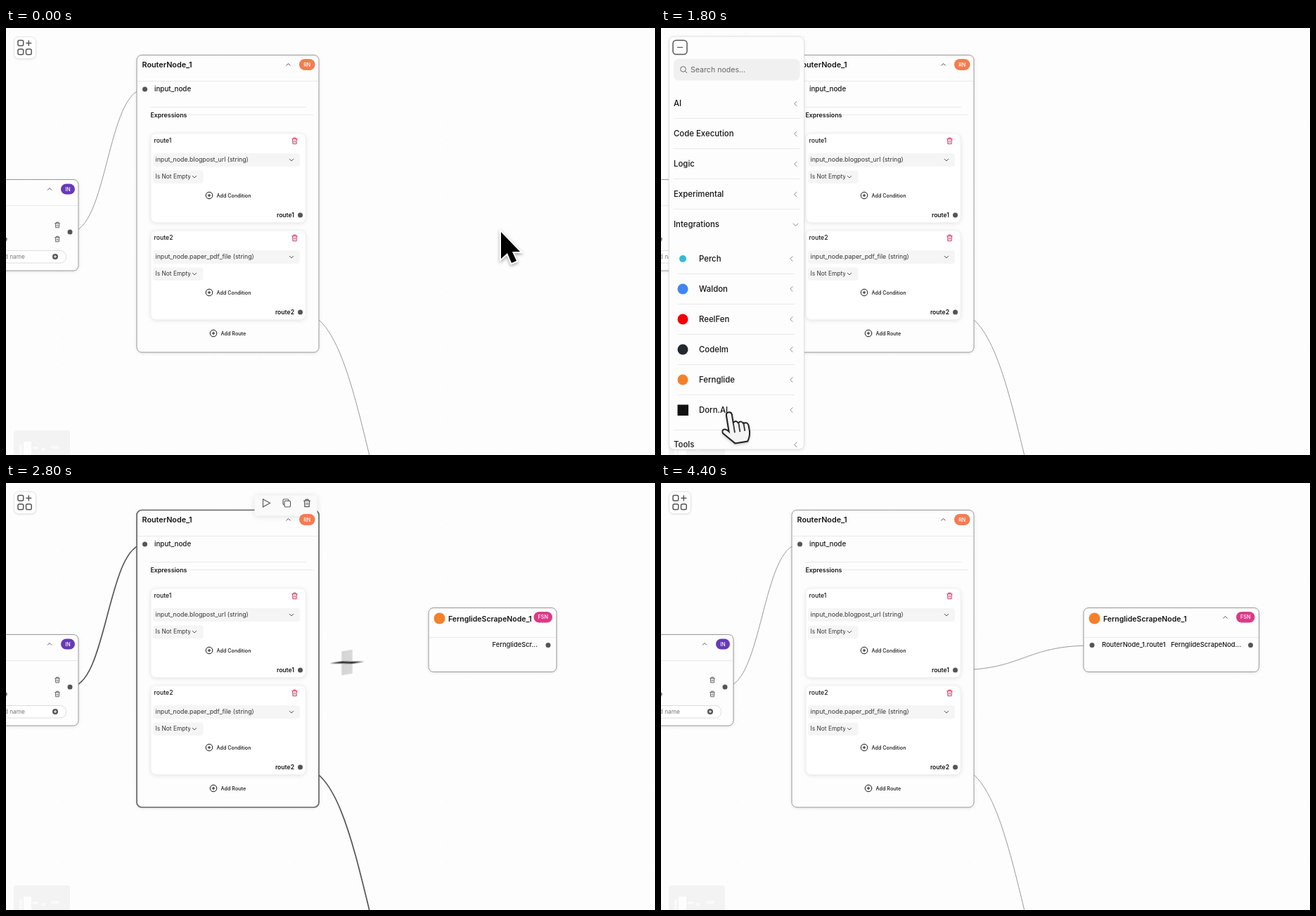
Write an HTML page with a canvas that moves like this. It is 923 px wide and 607 px high and loops after 4540 ms.

```html
<!DOCTYPE html>
<html lang="en">
<head>
<meta charset="utf-8">
<title>Node editor</title>
<style>
html, body { margin: 0; width: 100%; height: 100%; overflow: hidden; background: #fdfdfd; }
canvas { display: block; width: 923px; height: 607px; }
</style>
</head>
<body>
<canvas id="stage" width="923" height="607"></canvas>
<script>
const W = 923, H = 607, LOOP = 4540, STEP = 200 / 3, LAST = 66;
const stage = document.getElementById('stage').getContext('2d');
const newLayer = () => Object.assign(document.createElement('canvas'), { width: W, height: H }).getContext('2d');
const blur = newLayer(), sprite = newLayer();
let c = stage;

const BRAND = 'Fernglide';
const FLAME = '#f4812a', INK = '#151515', GRAY = '#555', RED = '#d0305f';
const T = { panelOpen: 960, nodeAdded: 1930, panelClose: 2130, routerPicked: 2690, connected: 2930, edgeLeft: 3400 };

// Pointer stops: time, x, y, shape used from the previous stop to this one
const STOPS = [
  [0, 704, 290, 'arrow'], [130, 704, 290, 'arrow'],
  [900, 34, 14, 'grab'], [1064, 34, 14, 'hand'],
  [1458, 100, 515, 'hand'], [1600, 100, 515, 'hand'],
  [1720, 100, 545, 'hand'], [2098, 100, 545, 'hand'],
  [2358, 770, 345, 'grab'], [2400, 770, 345, 'grab'],
  [2560, 644, 203, 'grab'], [2690, 419, 266, 'grab'],
  [2715, 419, 266, 'cross'], [2915, 601, 236, 'cross'],
  [3330, 601, 236, 'cross'], [3600, 700, 437, 'arrow'],
  [LOOP, 700, 437, 'arrow']
];

const ease = p => p < .5 ? 2 * p * p : 1 - 2 * (1 - p) * (1 - p);
const span = (t, a, b) => ease(Math.min(1, Math.max(0, (t - a) / (b - a))));
const between = (t, a, b) => t >= a && t < b;

function text(str, x, y, size, { weight = 500, color = INK, align = 'left' } = {}) {
  c.font = `${weight} ${size}px Inter, sans-serif`;
  c.fillStyle = color;
  c.textAlign = align;
  c.textBaseline = 'middle';
  c.fillText(str, x, y);
}

function box(x, y, w, h, r, fill, stroke, width = 1, shadow = 0) {
  c.save();
  c.beginPath();
  c.roundRect(x, y, w, h, r);
  if (shadow) {
    c.shadowColor = 'rgba(0,0,0,.12)';
    c.shadowBlur = shadow;
    c.shadowOffsetY = 1;
  }
  if (fill) { c.fillStyle = fill; c.fill(); }
  c.restore();
  if (stroke) { c.strokeStyle = stroke; c.lineWidth = width; c.stroke(); }
}

function disc(x, y, r, fill, stroke) {
  c.beginPath();
  c.arc(x, y, r, 0, 7);
  if (fill) { c.fillStyle = fill; c.fill(); }
  if (stroke) { c.strokeStyle = stroke; c.lineWidth = 1; c.stroke(); }
}

function line(points, color = '#e9e9e9', width = 1) {
  c.beginPath();
  points.forEach(([x, y]) => c.lineTo(x, y));
  c.strokeStyle = color;
  c.lineWidth = width;
  c.stroke();
}

const rule = (x1, x2, y, color) => line([[x1, y + .5], [x2, y + .5]], color);

function plus(x, y, r, color, width) {
  line([[x - r, y], [x + r, y]], color, width);
  line([[x, y - r], [x, y + r]], color, width);
}

const CHEVRON = { up: [0, -1], down: [0, 1], left: [-1, 0] };
function chevron(x, y, dir, s = 3, color = GRAY) {
  const [dx, dy] = CHEVRON[dir], h = s / 2;
  line([[x - dx * h - dy * s, y - dy * h - dx * s], [x + dx * h, y + dy * h],
        [x - dx * h + dy * s, y - dy * h + dx * s]], color);
}

function trash(x, y, color, s = 1) {
  c.save();
  c.translate(x, y);
  c.scale(s, s);
  line([[-4, -2.7], [4, -2.7]], color);
  line([[-1.6, -2.9], [-1.6, -4.3], [1.6, -4.3], [1.6, -2.9]], color);
  line([[-3, -2.5], [-2.6, 4.2], [2.6, 4.2], [3, -2.5]], color);
  line([[-.9, -.8], [-.9, 2.4]], color, .8);
  line([[.9, -.8], [.9, 2.4]], color, .8);
  c.restore();
}

function badge(label, x, y, w, h, color) {
  box(x, y, w, h, h / 2, color);
  text(label, x + w / 2, y + h / 2 + .5, 7.2, { color: '#fff', align: 'center' });
}

function edge(x1, y1, x2, y2, strong) {
  const mid = (x1 + x2) / 2;
  c.beginPath();
  c.moveTo(x1, y1);
  c.bezierCurveTo(mid, y1, mid, y2, x2, y2);
  c.strokeStyle = strong ? '#555' : '#999';
  c.lineWidth = strong ? 1.7 : 1;
  c.stroke();
}

function frame(x, y, w, h, strong) {
  box(x, y, w, h, 7, '#fdfdfd', strong ? '#666' : '#999', strong ? 1.7 : 1, 5);
}

function toolbar(right, top) {
  box(right - 92, top - 21, 89, 29, 4, '#fafafa', null, 0, 9);
  const x = right - 75.5, y = top - 10;
  line([[x - 4.5, y - 5.5], [x + 5.5, y], [x - 4.5, y + 5.5], [x - 4.5, y - 5.5], [x, y - 3]], GRAY, 1.1);
  box(x + 24, y - 5.5, 8, 8, 1.5, null, GRAY, 1.1);
  box(x + 26, y - 3, 8.5, 8.5, 1.5, '#fafafa', GRAY, 1.1);
  trash(x + 58, y, GRAY, 1.2);
}

function backdrop() {
  c.fillStyle = '#fdfdfd';
  c.fillRect(0, 0, W, H);
  c.fillStyle = '#f1f1f1';
  for (let x = 5; x < W; x += 12.7)
    for (let y = 7; y < H; y += 12.7) c.fillRect(Math.round(x), Math.round(y), 1, 1);
}

function miniMap() {
  box(11, 572, 80, 50, 4, '#f3f3f3');
  box(19, 592, 4, 15, 0, '#fafafa');
  box(25, 588, 11, 24, 1, '#fdfdfd');
  box(38, 595, 8, 4, 1, '#fafafa');
  box(50, 597, 6, 4, 1, '#fafafa');
  box(64, 594, 12, 4, 1, '#fafafa');
}

function inputNode() {
  frame(-60, 215.5, 163, 129.5);
  chevron(62, 229, 'up');
  badge('IN', 78, 221.5, 20, 15, '#673ab7');
  rule(0, 102, 252);
  trash(73, 280, GRAY, .9);
  trash(73, 300, GRAY, .9);
  text('file', 2, 300.5, 8.6, { align: 'right' });
  box(-40, 316.5, 125.5, 17.5, 8, '#fff', '#ddd');
  text('field name', 27, 325, 8.4, { weight: 400, color: '#777', align: 'right' });
  disc(70, 325, 4, GRAY);
  plus(70, 325, 2, '#fff', 1);
  disc(91, 290, 3.5, GRAY);
}

function routeCard(top, name, field) {
  box(206, top, 220, 126.5, 7, '#fff', '#f2f2f2', 1, 6);
  text(name, 210.5, top + 10.5, 8.7);
  trash(410.5, top + 10.5, RED);
  box(209, top + 28, 209, 19, 4, '#f5f5f5');
  text(field, 212.5, top + 37.5, 8.8, { weight: 400, color: '#333' });
  chevron(406, top + 37.5, 'down');
  box(209, top + 52.5, 71.5, 18.5, 4, '#f5f5f5');
  c.save();
  c.beginPath();
  c.rect(209, top + 52, 53, 20);
  c.clip();
  text('Is Not Empty', 212.5, top + 61.5, 8.4, { weight: 400, color: '#333' });
  c.restore();
  chevron(268, top + 61.5, 'down');
  addButton('Add Condition', 289, top + 88);
  text(name, 410, top + 116, 8.6, { weight: 600, align: 'right' });
  disc(418.5, top + 116, 3.5, GRAY);
}

function addButton(label, x, y) {
  disc(x, y, 4.8, null, INK);
  plus(x, y, 2.3, INK, 1);
  text(label, x + 10.5, y + .5, 7.2);
}

function routerNode(selected) {
  frame(186, 38.5, 259, 422.5, selected);
  if (selected) toolbar(445.5, 38.5);
  text('RouterNode_1', 193.5, 52.5, 10.8, { weight: 600 });
  chevron(401.5, 52, 'up');
  badge('RN', 417, 44, 22.5, 16, '#f47c50');
  rule(187, 444, 75);
  disc(197.5, 87, 3.5, GRAY);
  text('input_node', 211, 87, 9.8);
  rule(205, 427, 112);
  text('Expressions', 205.5, 124, 8.8, { weight: 600 });
  rule(258, 437, 123);
  routeCard(150, 'route1', 'input_node.blogpost_url (string)');
  routeCard(288, 'route2', 'input_node.paper_pdf_file (string)');
  addButton('Add Route', 295, 434);
}

function scrapeNode(x, y, selected, linked) {
  const w = linked ? 249.5 : 182;
  frame(x, y, w, 91, selected);
  if (selected) toolbar(x + w, y);
  disc(x + 15.5, y + 15, 8, FLAME);
  text(`${BRAND}ScrapeNode_1`, x + 28, y + 16.5, 10.5, { weight: 600 });
  if (linked) chevron(x + 201.5, y + 13.5, 'up');
  badge('FSN', x + w - 32.5, y + 5.5, 26.5, 15.5, '#dc3b88');
  rule(x + 1, x + w - 1, Math.round(y + 41));
  const right = { align: 'right' };
  if (linked) {
    disc(x + 12, y + 53, 3.5, GRAY);
    text('RouterNode_1.route1', x + 26, y + 53, 9.4);
    text(`${BRAND}ScrapeNod...`, x + 224, y + 53, 9.3, right);
  } else {
    text(`${BRAND}Scr...`, x + 155, y + 53, 9.3, right);
  }
  disc(x + w - 12, y + 53, 3.5, GRAY);
}

function edgeButtons() {
  box(496, 238, 41, 21, 10, '#fdfdfd');
  disc(504.5, 248, 5, GRAY);
  plus(504.5, 248, 2.4, '#fff', 1);
  box(519, 240, 16, 16, 8, '#fcf3f5');
  trash(527, 248, RED, 1.05);
}

function menuButton() {
  box(11.5, 12.5, 31, 31, 6, '#fff', '#e6e6e6', 1, 3);
  for (const [x, y] of [[17, 17.5], [17, 30], [28.5, 30]]) box(x, y, 7.7, 7.7, 2, null, GRAY, 1.5);
  plus(32.3, 21.5, 4, GRAY, 1.5);
}

function panel() {
  box(11.5, 12, 192, 587, 7, '#fdfdfd', '#e2e2e2', 1, 5);
  box(17, 17.5, 20, 20, 4.5, '#fff', GRAY, 1.5);
  line([[23, 27.5], [31, 27.5]], GRAY, 1.2);
  box(18, 44, 179.5, 30.5, 7, '#f0f0f0');
  disc(31.5, 58.5, 3.8, null, '#666');
  line([[34.2, 61.2], [37, 64]], '#666');
  text('Search nodes...', 42, 59.5, 10.6, { weight: 400, color: '#666' });

  ['AI', 'Code Execution', 'Logic', 'Experimental', 'Integrations'].forEach((name, i) => {
    const y = 108 + i * 43;
    text(name, 18, y, 11.4);
    chevron(191.5, y - .5, i < 4 ? 'left' : 'down', 3.6, '#888');
    if (i < 4) rule(18, 197, y + 20);
  });

  const apps = [['Perch', '#36b8d8'], ['Waldon', '#4285f4'], ['ReelFen', '#f00000'],
                ['Codelm', '#24292f'], [BRAND, FLAME], ['Dorn.AI', '#111', true]];
  apps.forEach(([name, color, square], i) => {
    const y = 328.5 + i * 43;
    if (square) box(23.5, y - 8, 15.5, 15.5, 0, color);
    else disc(31, y - .5, i ? 7.5 : 5, color);
    text(name, 54, y, 11.4);
    chevron(185.5, y - .5, 'left', 3.6, '#888');
    if (i < 5) rule(24, 190, Math.floor(y + 20.5));
  });
  rule(18, 197, 571);
  text('Tools', 18, 593, 11.4);
  chevron(191.5, 592.5, 'left', 3.6, '#888');
}

const HANDS = {
  hand: 'M-4 24V4Q-4 0 0 0Q4 0 4 4V16Q8 12 11 17Q16 14 18 19Q24 17 25 23V32Q24 40 20 45H2Q-6 36 -13 28Q-14 22 -9 23Q-6 24 -4 27Z',
  grab: 'M-4 24V8Q-4 4 0 4Q4 4 4 8Q4 2 8 2Q12 2 12 6Q12 3 15 4Q19 4 19 9Q20 7 23 8Q26 9 26 13V30Q25 38 20 45H2Q-6 36 -13 28Q-14 22 -9 23Q-6 24 -4 27Z'
};
const ARROW = 'M0 0V38L9 30L15 44L22 41L16 28H27Z';

const SHAPES = {
  arrow() {
    const path = new Path2D(ARROW);
    c.strokeStyle = '#fff';
    c.lineWidth = 4;
    c.shadowColor = 'rgba(0,0,0,.35)';
    c.shadowBlur = 4;
    c.shadowOffsetY = 2;
    c.stroke(path);
    c.shadowColor = 'transparent';
    c.fillStyle = '#000';
    c.fill(path);
  },
  hand() { palm('hand', 17, -.16); },
  grab(speed) { palm('grab', 9, .3 * Math.tanh(speed * 2)); },
  cross() {
    plus(0, 0, 18, '#fff', 5);
    plus(0, 0, 17, '#111', 2.6);
  }
};

function palm(kind, top, tilt) {
  const path = new Path2D(HANDS[kind]);
  c.translate(6, 24);
  c.rotate(tilt);
  c.translate(-6, -24);
  c.shadowColor = 'rgba(0,0,0,.3)';
  c.shadowBlur = 4;
  c.shadowOffsetY = 2;
  c.fillStyle = '#f4f4f4';
  c.fill(path);
  c.shadowColor = 'transparent';
  c.strokeStyle = '#222';
  c.lineWidth = 2;
  c.stroke(path);
  for (const x of [4, 11.5, 18.5]) line([[x, top], [x, 30]], '#333', 1.8);
}

function pointerAt(t) {
  const i = Math.max(1, STOPS.findIndex(s => s[0] > t));
  const [t0, x0, y0] = STOPS[i - 1], [t1, x1, y1, kind] = STOPS[i];
  const p = span(t, t0, t1);
  return { x: x0 + (x1 - x0) * p, y: y0 + (y1 - y0) * p, kind };
}

// Averages several nearby poses to give motion blur
function pointer(t, alpha) {
  const shutter = 10, { kind } = pointerAt(t);
  const poseAt = k => pointerAt(Math.max(0, t + shutter * (k - .5)));
  const from = poseAt(0), to = poseAt(1);
  const count = Math.hypot(to.x - from.x, to.y - from.y) > .5 ? 8 : 1;
  blur.clearRect(0, 0, W, H);
  blur.globalCompositeOperation = 'lighter';
  blur.globalAlpha = 1 / count;
  c = sprite;
  for (let i = 0; i < count; i++) {
    const { x, y } = poseAt((i + .5) / count);
    c.clearRect(0, 0, W, H);
    c.save();
    c.translate(x, y);
    SHAPES[kind]((to.x - from.x) / shutter);
    c.restore();
    blur.drawImage(sprite.canvas, 0, 0);
  }
  c = stage;
  c.globalAlpha = alpha;
  c.drawImage(blur.canvas, 0, 0);
  c.globalAlpha = 1;
}

function draw(t) {
  const picked = between(t, T.routerPicked, T.connected);
  const linked = t >= T.connected;
  const hovered = between(t, T.connected, T.edgeLeft);
  backdrop();
  miniMap();
  edge(91, 290, 197, 87, picked);
  edge(419, 404, 612, 800, picked);
  if (linked) edge(419, 266, 613, 231, hovered);
  inputNode();
  routerNode(picked);
  if (t >= T.nodeAdded) {
    const p = span(t, 2400, 2560);
    scrapeNode(727 - 126 * p, 319.5 - 142 * p, t < T.routerPicked, linked);
  }
  if (hovered) edgeButtons();
  if (between(t, T.panelOpen, T.panelClose)) panel();
  else menuButton();
  const alpha = t < 4320 ? 1 : t < 4390 ? .5 : 0;
  if (alpha) pointer(t, alpha);
}

function tick() {
  const t = performance.now() % LOOP;
  draw(Math.min(LAST, Math.floor((t + 5) / STEP)) * STEP);
  requestAnimationFrame(tick);
}
tick();
</script>
</body>
</html>
```
